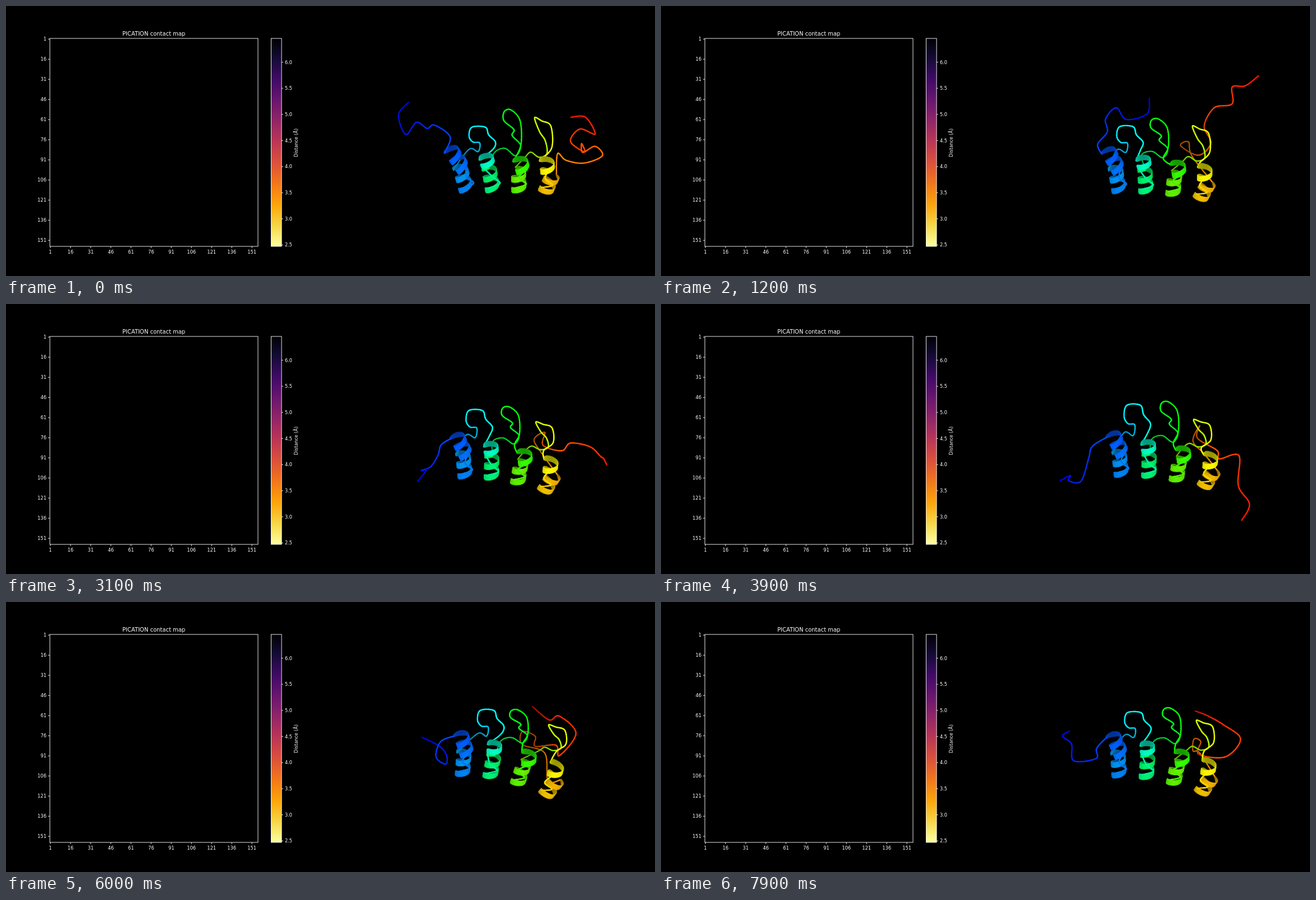
Recreate the animation shown at these times as an HTML page with a canvas. Size 1159 px wide and 483 px high, loop 8 s.

```html
<!DOCTYPE html>
<html lang="en">
<head>
<meta charset="utf-8">
<title>Contact map</title>
<style>
html, body { margin: 0; width: 100%; height: 100%; overflow: hidden; background: #000; }
svg, canvas { position: absolute; left: 0; top: 0; }
text { font: 8.3px "DejaVu Sans", sans-serif; fill: #fff; }
</style>
</head>
<body>
<svg id="plot" width="1159" height="483" viewBox="0 0 1159 483">
  <defs><linearGradient id="inferno" x1="0" y1="0" x2="0" y2="1"></linearGradient></defs>
  <rect x="473.5" y="58" width="18.6" height="372" fill="url(#inferno)"/>
  <g fill="none" stroke="#fff" stroke-width=".9">
    <rect x="78.3" y="58" width="371.7" height="372"/>
    <rect x="473.5" y="58" width="18.6" height="372"/>
    <path id="ticks"/>
  </g>
  <text x="264" y="53" text-anchor="middle" style="font-size:10px">PICATION contact map</text>
  <text transform="translate(520.6 244.6) rotate(-90)" text-anchor="middle">Distance (Å)</text>
</svg>
<canvas id="stage" width="1159" height="483"></canvas>
<script>
const LOOP = 8000, STEP = 100, SAMPLES = 90;
const RADIUS = 13, TILT = 6, PITCH = 19, WIDTH = 9;
const $ = id => document.getElementById(id);
const lerp = (a, b, k) => a + (b - a) * k;
const mix = (a, b, k) => a.map((v, i) => lerp(v, b[i], k));
const clamp = v => Math.max(0, Math.min(1, v));

// ---- plot ----
function add(parent, tag, attrs, label) {
  const el = document.createElementNS("http://www.w3.org/2000/svg", tag);
  for (const k in attrs) el.setAttribute(k, attrs[k]);
  if (label) el.textContent = label;
  parent.append(el);
}
["000004", "160b39", "420a68", "6a176e", "932667", "bc3754", "dd513a", "f37819", "fca50a", "f6d746", "fcffa4"]
  .forEach((c, i) => add($("inferno"), "stop", { offset: i / 10, "stop-color": "#" + c }));
let ticks = "";
for (let v = 1; v < 155; v += 15) {
  const d = (v - .5) * 2.4, x = 78 + d, y = 58 + d;
  ticks += `M${x} 430v2.9M78 ${y}h-2.9`;
  add($("plot"), "text", { x, y: 442.8, "text-anchor": "middle" }, v);
  add($("plot"), "text", { x: 72.2, y: y + 3, "text-anchor": "end" }, v);
}
for (let v = 2.5; v < 6.2; v += .5) {
  const y = 427.4 - (v - 2.5) * 93.4;
  ticks += `M492 ${y}h2.9`;
  add($("plot"), "text", { x: 497.9, y: y + 3 }, v.toFixed(1));
}
$("ticks").setAttribute("d", ticks);

// ---- molecule ----
// Four repeats, each a helix down and a helix up, joined by loops.
// Per repeat, from its foot: top and end of the first helix, end of the second.
const repeats = [
  [-15, -73, 4, -34, -4, -42], [-1, -58, 0, -48, 1, -46],
  [12, -56, 15, -31, 6, -37], [13, -57, 11, -33, 18, -29]
];
// Loops from their apex, for a height of 62
const loops = [
  [-18, 47, -2, 52, 1, 34, -11, 32, -18, 20, -13, 1, 11, 1, 17, 17, 29, 32, 24, 48],
  [-30, 57, -11, 51, 8, 61, 17, 47, 2, 34, 5, 26, -13, 14, -12, 2, 0, 0, 16, 14, 18, 44, 9, 62],
  [-24, 63, -13, 54, 2, 62, 16, 56, 13, 36, 3, 22, -6, 0, 7, 5, 23, 13, 25, 46, 8, 64]
];
const helixHues = [[221, 211], [209, 200], [170, 165], [152, 140], [113, 104], [98, 92], [60, 57], [49, 43]];
const loopHues = [[196, 171], [137, 115], [88, 60]];

// row: first foot x, spacing, foot y, sag, lean; apex: top of each loop;
// head and tail: bends of the two free ends
const poses = [
  { t: 0, row: [822, 47, 329, .4, -11], apex: [845, 216, 902, 186, 950, 200],
    head: [719,172, 701,195, 714,230, 733,208, 752,219, 765,213, 793,234],
    tail: [985,264, 1000,276, 1032,281, 1065,268, 1052,251, 1030,262, 1028,246, 1033,261, 1008,242, 1025,220, 1052,229, 1035,199, 1009,199] },
  { t: 1200, row: [818, 48, 331, 1.6, -4], apex: [832, 215, 888, 202, 955, 215],
    head: [872,165, 868,193, 831,203, 813,182, 794,202, 797,225, 780,247],
    tail: [948,268, 942,243, 928,250, 960,267, 982,245, 970,215, 988,182, 1020,175, 1020,145, 1043,143, 1067,125] },
  { t: 2400, row: [818, 45, 311, 3.5, 0], apex: [835, 198, 893, 192, 948, 215],
    head: [754,319, 767,290, 754,282, 766,268, 778,266, 783,250],
    tail: [945,266, 937,240, 962,240, 960,264, 992,263, 1018,224, 1053,242, 1088,226, 1082,206, 1104,201] },
  { t: 3900, row: [822, 49, 306, 2.4, 0], apex: [845, 180, 906, 175, 957, 207],
    head: [713,316, 731,307, 728,316, 750,317, 764,275, 770,255],
    tail: [970,268, 950,245, 962,218, 958,240, 993,262, 997,277, 1032,271, 1031,325, 1051,358, 1037,387] },
  { t: 4800, row: [817, 48.5, 306, 2.4, 1], apex: [838, 190, 898, 177, 955, 201],
    head: [829,373, 818,344, 791,338, 784,312, 757,308, 770,262],
    tail: [965,255, 953,200, 964,230, 962,245, 994,265, 1003,278, 1020,300, 1054,307, 1077,339, 1069,356, 1091,374] },
  { t: 6000, row: [815, 49, 309, 4.2, 10], apex: [860, 193, 914, 193, 975, 220],
    head: [743,242, 774,258, 787,275, 785,290, 768,277, 776,250],
    tail: [968,320, 962,270, 922,255, 922,232, 945,240, 945,258, 982,256, 988,275, 1018,235, 988,204, 970,211, 940,187] },
  { t: 7900, row: [818, 48.5, 311, 3.5, 3], apex: [846, 197, 910, 190, 962, 212],
    head: [729,231, 717,240, 733,254, 737,284, 777,280, 778,262],
    tail: [962,270, 950,266, 952,245, 964,250, 960,272, 1008,277, 1035,245, 1005,220, 975,203, 954,195] }
];

// Axes of the eight helices
function axes([x, gap, y, sag, lean]) {
  return repeats.flatMap((rep, i) => {
    const foot = [x + gap * i, y + sag * i * i];
    const at = j => [foot[0] + rep[j] - lean * rep[j + 1] / 60, foot[1] + rep[j + 1]];
    return [[...at(0), ...at(2)], [...foot, ...at(4)]];
  });
}
const turnCount = axes([0, 0, 0, 0, 0]).map(([x0, y0, x1, y1]) =>
  Math.max(1, Math.hypot(x1 - x0, y1 - y0) / PITCH));

// Point on a right-handed helix; z > 0 faces the viewer
function onHelix(axis, i, s) {
  const [x0, y0, x1, y1] = axis, len = Math.hypot(x1 - x0, y1 - y0);
  const dx = (x1 - x0) / len, dy = (y1 - y0) / len;
  const a = Math.PI * ((i % 2 ? -.8 : .5) + 2 * turnCount[i] * s);
  const z = Math.cos(a), r = RADIUS * Math.sin(a);
  return { x: lerp(x0, x1, s) - dy * r, y: lerp(y0, y1, s) + dx * r + TILT * z, z, dx, dy };
}
function endOf(helices, i, s) {
  const p = onHelix(helices[i], i, s);
  return [p.x, p.y];
}

// Smooth curve through the points as a flat list of samples
function smooth(flat) {
  const n = flat.length / 2, out = [];
  const at = (i, c) => flat[2 * Math.max(0, Math.min(n - 1, i)) + c];
  for (let j = 0; j <= SAMPLES; j++) {
    const u = j / SAMPLES * (n - 1), i = Math.min(n - 2, Math.floor(u)), k = u - i;
    for (const c of [0, 1]) {
      const a = at(i - 1, c), b = at(i, c), d = at(i + 1, c), e = at(i + 2, c);
      out.push(b + k / 2 * (d - a + k * (2 * a - 5 * b + 4 * d - e + k * (3 * (b - d) + e - a))));
    }
  }
  return out;
}
for (const p of poses) {
  const helices = axes(p.row);
  p.head = smooth([...p.head, ...endOf(helices, 0, 0)]);
  p.tail = smooth([...endOf(helices, 7, 1), ...p.tail]);
}

function poseAt(t) {
  let i = 0;
  while (i < poses.length - 2 && t >= poses[i + 1].t) i++;
  const a = poses[i], b = poses[i + 1], k = clamp((t - a.t) / (b.t - a.t)), pose = {};
  for (const part of ["row", "apex", "head", "tail"]) pose[part] = mix(a[part], b[part], k);
  return pose;
}

// ---- drawing ----
const ctx = $("stage").getContext("2d");
ctx.lineCap = ctx.lineJoin = "round";
const color = (hue, shade) => `hsl(${hue} 100% ${50 * shade}%)`;

function tube(pts, [hue0, hue1], shade) {
  const n = pts.length / 2 - 1;
  for (let i = 0; i < n; i++) {
    const u = i / n, x = pts[2 * i], b = shade(u, x);
    ctx.lineWidth = 1.4 + b;
    ctx.strokeStyle = color(lerp(hue0, hue1, u), b);
    ctx.beginPath();
    ctx.moveTo(x, pts[2 * i + 1]);
    ctx.lineTo(pts[2 * i + 2], pts[2 * i + 3]);
    ctx.stroke();
  }
}

function ribbon(axis, i) {
  const n = Math.round(turnCount[i] * 26), quads = [];
  const edge = s => {
    const p = onHelix(axis, i, s);
    const w = Math.min(WIDTH, 3 + 60 * Math.min(s, 1 - s)) / 2;
    return { z: p.z, pts: [p.x - p.dx * w, p.y - p.dy * w, p.x + p.dx * w, p.y + p.dy * w] };
  };
  for (let j = 0; j < n; j++) {
    const a = edge(j / n), b = edge((j + 1) / n), z = (a.z + b.z) / 2;
    const shade = .8 + .2 * z - (i % 2) * .05;
    quads.push({ z, a: a.pts, b: b.pts, fill: color(lerp(...helixHues[i], j / n), shade) });
  }
  quads.sort((p, q) => p.z - q.z);
  ctx.lineWidth = .9;
  for (const { a, b, fill } of quads) {
    ctx.fillStyle = ctx.strokeStyle = fill;
    ctx.beginPath();
    ctx.moveTo(a[0], a[1]);
    ctx.lineTo(a[2], a[3]);
    ctx.lineTo(b[2], b[3]);
    ctx.lineTo(b[0], b[1]);
    ctx.closePath();
    ctx.fill();
    ctx.stroke();
  }
}

function loop(helices, apex, i) {
  const x = apex[2 * i], y = apex[2 * i + 1], foot = helices[2 * i + 1][1];
  const stretch = (foot - y - 60) / 62;
  const pts = loops[i].map((v, j) => j % 2 ? y + v * stretch : x + v);
  tube(smooth([...endOf(helices, 2 * i + 1, 1), ...pts, ...endOf(helices, 2 * i + 2, 0)]),
    loopHues[i], u => Math.min(1, .7 + u * .75));
}

// Short turn between the two helices of a repeat
function turn(helices, i) {
  const [x, y] = helices[i + 1];
  tube(smooth([...endOf(helices, i, 1), x, y - 24, x + 13, y - 12, ...endOf(helices, i + 1, 0)]),
    [helixHues[i][1], helixHues[i + 1][0]], () => .95);
}

function draw(t) {
  const { row, apex, head, tail } = poseAt(t), helices = axes(row);
  ctx.clearRect(0, 0, 1159, 483);
  // the tail lies deeper, hence darker, where it passes behind the last repeat
  tube(tail, [36, 4], (u, x) => lerp(.66, 1, clamp((x - 940) / 50)));
  for (let i = 1; i < 8; i += 2) ribbon(helices[i], i);
  for (let i = 0; i < 3; i++) loop(helices, apex, i);
  for (let i = 0; i < 8; i += 2) {
    turn(helices, i);
    ribbon(helices[i], i);
  }
  tube(head, [239, 222], u => lerp(.85, 1, u));
}

function tick() {
  draw(Math.floor(performance.now() % LOOP / STEP) * STEP);
  requestAnimationFrame(tick);
}
tick();
</script>
</body>
</html>
```
